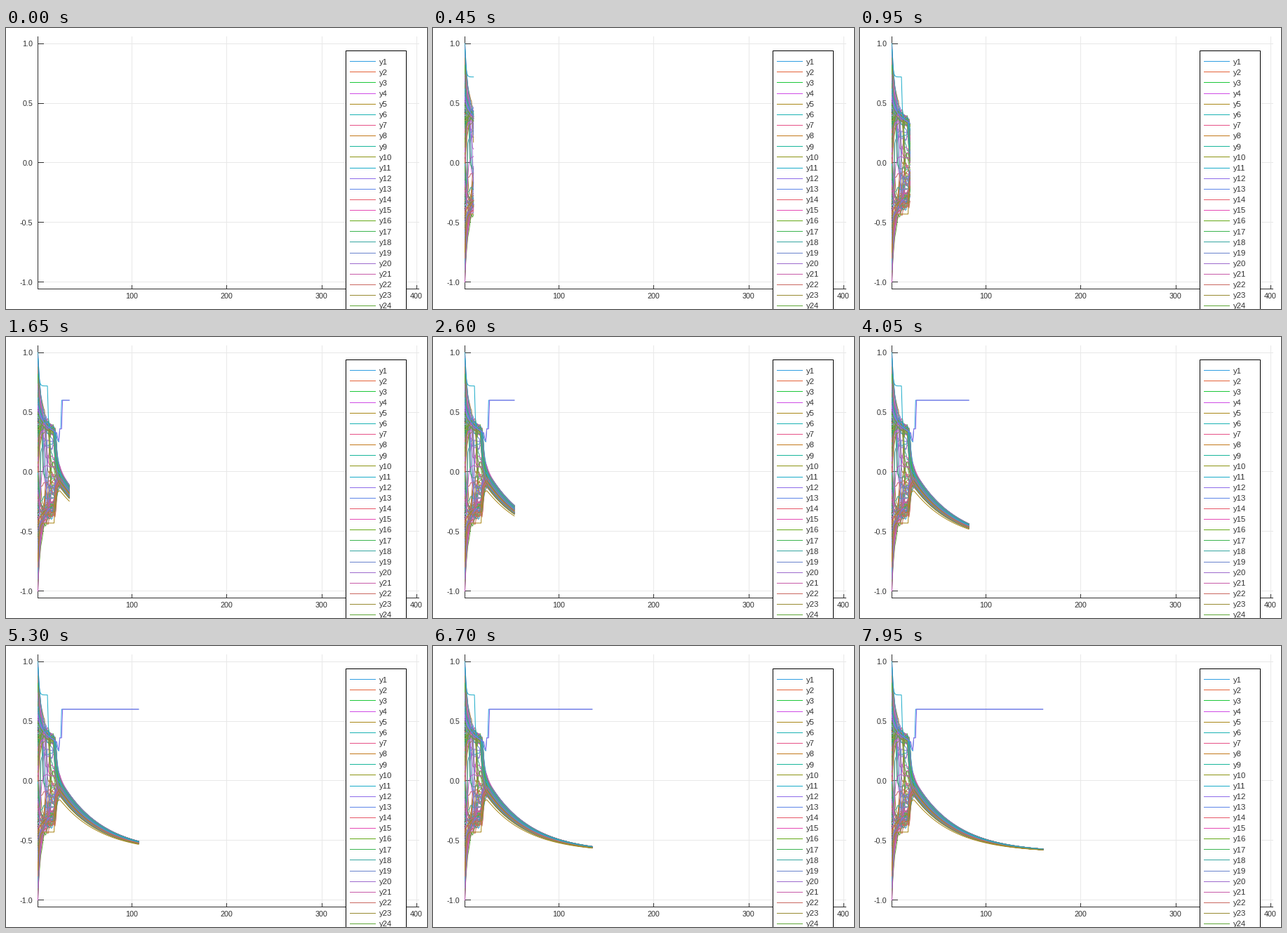
Write a matplotlib script that moves like this. It is 600 by 400 pixels and loops after 8000 ms.

```python
import colorsys
import numpy as np
import matplotlib.pyplot as plt
from matplotlib.animation import FuncAnimation
from matplotlib.patches import Rectangle

W, H, DPI = 600, 400, 100
STEPS, INTERVAL = 160, 50
AGENTS, ENTRIES = 100, 24
PX = 72 / DPI  # points per pixel
LUMA = 0.52
HUES = [203, 15, 130, 291, 46, 181, 338, 33, 170, 64, 190, 256, 223, 353, 319, 88]
INK = "#303030"

plt.rcParams["font.family"] = "Liberation Sans"
rng = np.random.default_rng(12)
xs = np.arange(1, STEPS + 1)


def px(x):
    return 45.5 + (x - 1) * 1.353


def py(y):
    return 191.9 - y * 169.75


def series_color(i):
    """Named hues first, then even hue steps, all at one brightness."""
    first = i < len(HUES)
    hue = HUES[i] if first else 130 + 47 * (i - len(HUES))
    rgb = np.array(colorsys.hls_to_rgb(hue % 360 / 360, 0.5, 0.75 if first else 0.5))
    luma = rgb @ [0.299, 0.587, 0.114]
    if luma > LUMA:
        return tuple(rgb * LUMA / luma)
    return tuple(rgb + (1 - rgb) * (LUMA - luma) / (1 - luma))


def join(before, after, start, rate):
    """Follow `before` until start, then relax onto `after`."""
    stay = np.exp(-np.maximum(xs - start, 0) / rate)
    return after + (before - after) * stay


def merged(c):
    """Joint track: decays towards -0.6, passing through c at x = 27."""
    return -0.6 + (0.6 + c) * np.exp(-(np.maximum(xs, 24) - 27) / 44)


upper = 0.39 - 0.005 * (xs - 8)
lower = -0.35 + 0.004 * (xs - 8)


def drifter(y0):
    """Settle into the upper or lower camp, maybe stray, then merge."""
    high = y0 + rng.normal(0, 0.1) > 0
    camp = (upper if high else lower) + rng.normal(0, 0.03)
    y = join(y0, camp, 1, rng.uniform(1.3, 3.6))
    if rng.random() < 0.35:
        y = join(y, rng.uniform(-0.3, 0.3), rng.uniform(2, 14), rng.uniform(0.6, 1.6))
    wobble = np.repeat(rng.normal(0, 0.014, STEPS // 2), 2)
    wobble[0] = 0
    rate = rng.uniform(1.2, 2.8 if high else 2)
    return join(y + wobble, merged(rng.uniform(-0.16, -0.024)),
                rng.uniform(17.5, 20), rate)


def holdout(y0, level, until, camp, c):
    """Hold one level for a while before joining the others."""
    y = join(join(y0, level, 1, 1), camp, until, 0.7)
    return join(y, merged(c), 18, 1.6)


def breakaway(y0, lag):
    """Leave the upper camp in two jumps and stay at 0.6."""
    y = join(join(y0, upper, 1, 3), 0.24, 20 + lag, 1.5)
    y = np.where(xs >= 24, 0.36, y)
    return np.where(xs >= 26 + lag, 0.6, y)


curves = [(drifter(y0), series_color(i))
          for i, y0 in enumerate(rng.permutation(np.linspace(-1, 1, AGENTS)))]
curves += [
    (holdout(0.95, 0.72, 11, upper, -0.06), series_color(10)),
    (holdout(-0.75, -0.43, 18, lower, -0.185), series_color(4)),
    (breakaway(0.62, 0), series_color(0)),
    (breakaway(0.55, 1), series_color(11)),
]

fig = plt.figure(figsize=(W / DPI, H / DPI), dpi=DPI, facecolor="white")
ax = fig.add_axes([0, 0, 1, 1])
ax.set_xlim(0, W)
ax.set_ylim(H, 0)
ax.axis("off")


def stroke(x, y, color, z):
    return ax.plot(x, y, color=color, lw=PX, zorder=z)[0]


def label(x, y, text, size, ha):
    ax.text(x, y + 3.9, text, fontsize=size * PX, color=INK, ha=ha,
            va="baseline", zorder=6)


def draw_axes():
    # whole coordinates snap to the centre of that pixel
    left, right, top, bottom = 45, 588, 12, 371
    for v in range(100, 500, 100):
        x = px(v) - 0.5
        stroke([x, x], [top, bottom], "#e8e8e8", 1)
        stroke([x, x], [bottom - 5, bottom], INK, 2)
        label(x, 381, str(v), 10.8, "center")
    for v in np.linspace(-1, 1, 5):
        y = py(v) - 0.5
        stroke([left, right], [y, y], "#e8e8e8", 1)
        stroke([left, left + 8], [y, y], INK, 2)
        label(38, y + 0.5, f"{v:.1f}", 10.8, "right")
    stroke([left, left], [top, bottom], INK, 2)
    stroke([left, right], [bottom, bottom], INK, 2)


def draw_legend():
    ax.add_patch(Rectangle((484, 32), 86, 420, fc="white", ec="black",
                           lw=PX, zorder=4))
    for i in range(ENTRIES):
        y = 47.2 + i * 15.13
        stroke([490, 526], [y, y], series_color(i), 5)
        label(532, y + 0.4, f"y{i + 1}", 11.2, "left")


draw_axes()
draw_legend()
lines = [stroke([], [], color, 3) for _, color in curves]


def update(frame):
    n = frame + 1 if frame else 0
    for line, (y, _) in zip(lines, curves):
        line.set_data(px(xs[:n]), py(y[:n]))
    return lines


anim = FuncAnimation(fig, update, frames=STEPS, interval=INTERVAL,
                     init_func=lambda: update(0), repeat=True, repeat_delay=0)
plt.show()
```
